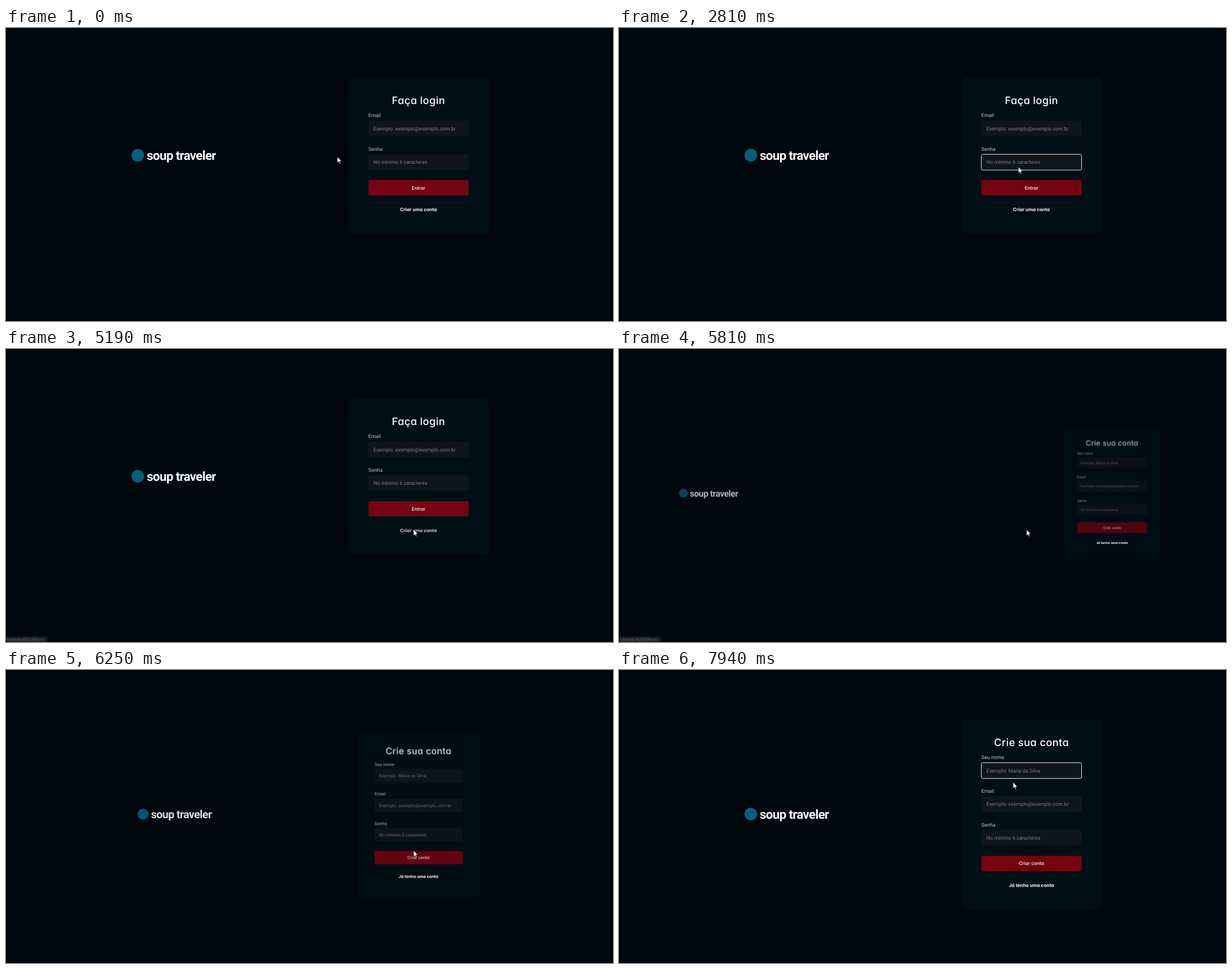
An HTML page for the animation above (8 s loop, 1078 px wide and 520 px high).

```html
<!DOCTYPE html>
<html lang="pt-BR">
<head>
<meta charset="utf-8">
<title>Login</title>
<style>
  @property --slide { syntax: "<length>"; inherits: true; initial-value: 0px; }
  @property --zoom { syntax: "<number>"; inherits: true; initial-value: 1; }

  html, body { margin: 0; width: 100%; height: 100%; overflow: hidden; background: #00080e; }
  svg { display: block; width: 1078px; height: 520px; overflow: hidden; }
  text { text-rendering: geometricPrecision; font: 400 9px Roboto, sans-serif; }

  .card { fill: #000f16; }
  .brand { font: 700 22.5px Roboto, sans-serif; letter-spacing: -.75px; fill: #f6f6f7; }
  .dot { fill: #065e7c; }
  .title, .action, .link {
    font-family: Inter, sans-serif;
    font-feature-settings: "cv11";
    text-anchor: middle;
    fill: #fff;
  }
  .title { font-size: 18.3px; font-weight: 500; letter-spacing: .38px; }
  .action { font-size: 8.3px; font-weight: 500; }
  .link { font-size: 8.25px; font-weight: 700; }
  .label { fill: #c4c4cc; }
  .hint { fill: #7c7c8a; }
  .input { fill: #0d161b; }
  .button { fill: #750310; }
  .ring { fill: none; stroke: #f2f2f2; }
  .caret { fill: #e6e6ea; }
  .tip rect { fill: #1b1e21; }
  .tip text { font: 400 6.7px "Open Sans", sans-serif; fill: #75787b; }

  /* Hard switches */
  .login, .ring, .caret, .hover { animation: 8s step-end infinite; }
  .login { animation-name: login; }
  .ring.email { animation-name: ring-email; }
  .ring.pass { animation-name: ring-pass; }
  .ring.name { animation-name: ring-name; }
  .caret.email { animation-name: caret-email; }
  .caret.pass { animation-name: caret-pass; }
  .caret.name { animation-name: caret-name; }
  .hover { animation-name: hover; }

  @keyframes login { 0% { visibility: visible } 66.28%, 100% { visibility: hidden } }
  @keyframes ring-email { 0%, 28.1%, 100% { opacity: 0 } 12.45% { opacity: 1 } }
  @keyframes ring-pass { 0%, 64.8%, 100% { opacity: 0 } 28.1% { opacity: 1 } }
  @keyframes ring-name { 0% { opacity: 0 } 92.2%, 100% { opacity: 1 } }
  @keyframes caret-email { 0%, 18.7%, 28.1%, 100% { opacity: 0 } 12.45%, 24.95% { opacity: 1 } }
  @keyframes caret-pass { 0%, 34.4%, 46.8%, 59.3%, 100% { opacity: 0 } 28.1%, 40.6%, 55.4% { opacity: 1 } }
  @keyframes caret-name { 0%, 98.5%, 100% { opacity: 0 } 92.2% { opacity: 1 } }
  @keyframes hover { 0% { fill: #fff } 61.7%, 100% { fill: #c9cdd0 } }

  .tip { animation: tip 8s linear infinite; }
  @keyframes tip {
    0%, 64.79% { opacity: 0 }
    64.8%, 73.8% { opacity: 1 }
    75.8%, 100% { opacity: 0 }
  }

  /* Slide in small and dim, then grow to full size; plain properties keep the text sharp */
  .from-left, .from-right { animation: enter 8s ease infinite; }
  .from-left {
    transform: translateX(calc(var(--slide) * -1)) scale(var(--zoom));
    transform-origin: 312px 256px;
  }
  .from-right {
    transform: translateX(var(--slide)) scale(var(--zoom));
    transform-origin: 732.8px 256px;
  }
  .dim { opacity: var(--zoom); }
  @keyframes enter {
    0%, 66.28% { --slide: 1123px; --zoom: .7 }
    77.2% { --slide: 0px; --zoom: .7 }
    79.92%, 100% { --slide: 0px; --zoom: 1 }
  }

  .pointer { fill: #fff; stroke: #000; stroke-width: .7; animation: pointer 8s ease-in-out infinite; }
  @keyframes pointer {
    0% { transform: translate(588.3px, 228.3px) }
    10.1%, 18% { transform: translate(701.3px, 176.2px) }
    25%, 34.4% { transform: translate(709px, 246px) }
    44.5%, 45% { transform: translate(736px, 281.5px) }
    50.75%, 52.4% { transform: translate(727px, 277.7px) }
    53.1%, 54.7% { transform: translate(722.3px, 277.7px) }
    62.5%, 80.5% { transform: translate(723.7px, 320.2px) }
    90.6%, 96.9% { transform: translate(698.4px, 177px) }
    99.25%, 100% { transform: translate(699.7px, 199px) }
  }
</style>
</head>
<body>
<svg viewBox="0 0 1078 520">
  <defs>
    <rect id="input" class="input" x="643.6" y="164.3" width="178.1" height="28" rx="2.8"/>
    <rect id="ring" x="643.5" y="164.5" width="178" height="28" rx="2.8"/>
    <rect id="caret" x="652.6" y="174" width=".8" height="9.6"/>
    <rect id="button" class="button" x="643.6" y="270.1" width="178.1" height="27" rx="2.6"/>
    <g id="brand">
      <circle class="dot" cx="234" cy="225.8" r="11.2"/>
      <text class="brand" x="250" y="234">soup traveler</text>
    </g>
  </defs>

  <g class="login">
    <use href="#brand"/>
    <rect class="card" x="608" y="88" width="249.8" height="277" rx="9"/>
    <text class="title" x="732.6" y="134.7">Faça login</text>
    <g>
      <text class="label" x="643.6" y="158.2">Email</text>
      <use href="#input"/>
      <text class="hint" x="652.6" y="181.6">Exemplo: exemplo@exemplo.com.br</text>
      <use href="#ring" class="ring email"/>
      <use href="#caret" class="caret email"/>
    </g>
    <g transform="translate(0 59.6)">
      <text class="label" x="643.6" y="158.2">Senha</text>
      <use href="#input"/>
      <text class="hint" x="652.6" y="181.6">No mínimo 6 caracteres</text>
      <use href="#ring" class="ring pass"/>
      <use href="#caret" class="caret pass"/>
    </g>
    <use href="#button"/>
    <text class="action" x="732.5" y="286.6">Entrar</text>
    <text class="link hover" x="732.5" y="325">Criar uma conta</text>
  </g>

  <g class="from-left">
    <g class="dim"><use href="#brand" y="29.9"/></g>
  </g>
  <g class="from-right">
    <g class="dim">
      <rect class="card" x="608" y="88" width="249.8" height="336.3" rx="9"/>
      <text class="title" x="732.6" y="134.7">Crie sua conta</text>
      <g>
        <text class="label" x="643.6" y="158.2">Seu nome</text>
        <use href="#input"/>
        <text class="hint" x="652.6" y="181.6">Exemplo: Maria da Silva</text>
        <use href="#ring" class="ring name"/>
        <use href="#caret" class="caret name"/>
      </g>
      <g transform="translate(0 59.6)">
        <text class="label" x="643.6" y="158.2">Email</text>
        <use href="#input"/>
        <text class="hint" x="652.6" y="181.6">Exemplo: exemplo@exemplo.com.br</text>
      </g>
      <g transform="translate(0 119.4)">
        <text class="label" x="643.6" y="158.2">Senha</text>
        <use href="#input"/>
        <text class="hint" x="652.6" y="181.6">No mínimo 6 caracteres</text>
      </g>
      <use href="#button" y="59.7"/>
      <text class="action" x="732.5" y="346.3">Criar conta</text>
    </g>
    <text class="link" x="732.5" y="384.7">Já tenho uma conta</text>
  </g>

  <g class="tip">
    <rect x="-4" y="510.3" width="77.8" height="14" rx="2"/>
    <text x="2.2" y="518.3">sitefield:4826/fillform</text>
  </g>

  <path class="pointer" d="M0 0V11.2L2.6 8.9L4.3 12.7L6 11.9L4.3 8.2H7.7Z"/>
</svg>
</body>
</html>
```
